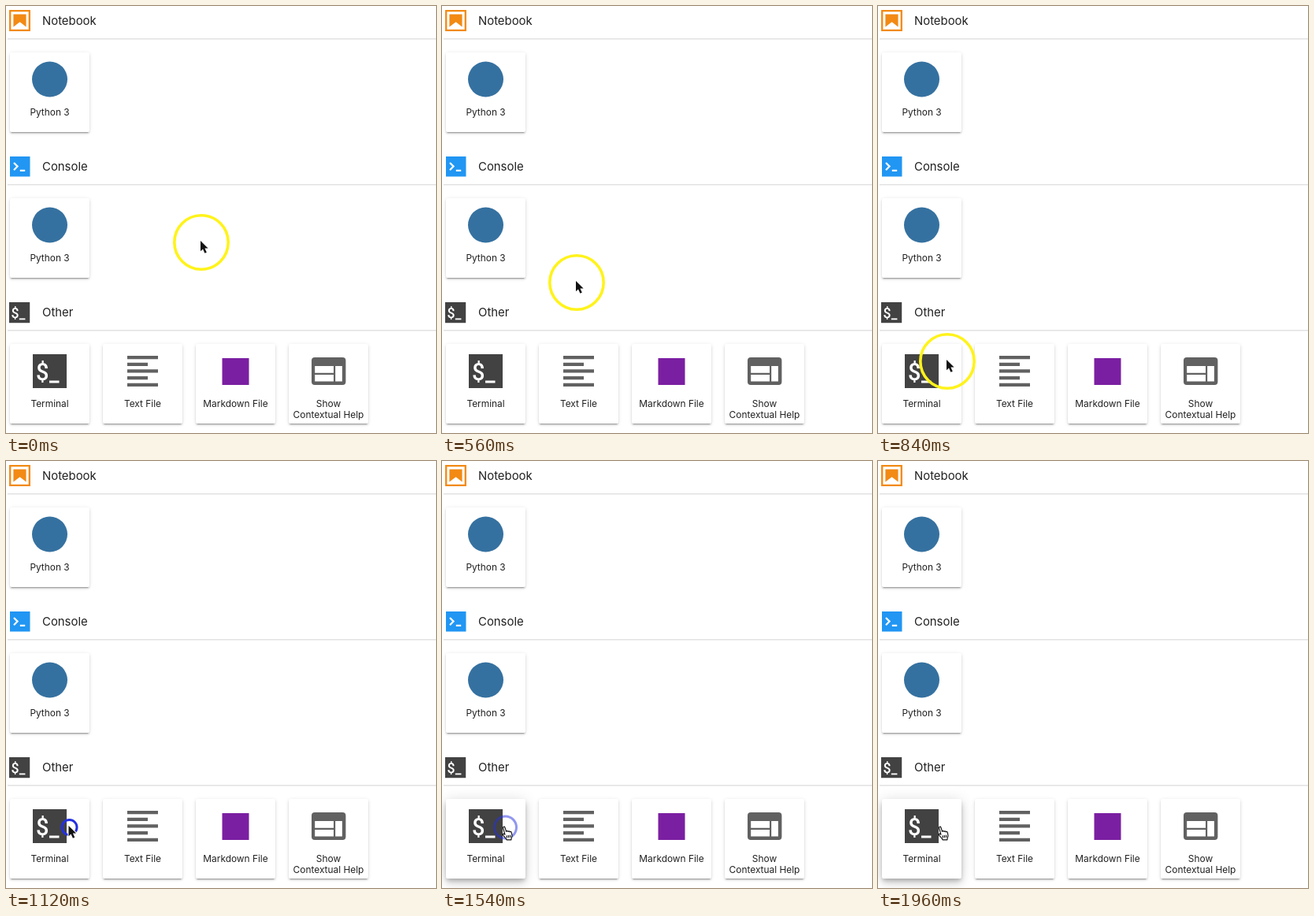
Animation of 546x542 px, one loop 2130 ms. Source, as an HTML page:

```html
<!DOCTYPE html>
<html lang="en">
<head>
<meta charset="utf-8">
<title>Launcher</title>
<style>
html, body { margin: 0; width: 100%; height: 100%; overflow: hidden; background: #fff; }
.card { position: absolute; width: 101px; height: 101px; border-radius: 2px; background: #fff; }
svg { position: absolute; left: 0; top: 0; }
text { font-family: Inter, "Open Sans", sans-serif; fill: #212121; }
.head { font-size: 14.9px; }
.label { font-size: 11.9px; text-anchor: middle; }
.dollar { font: 500 29px Roboto, sans-serif; fill: #fff; }
</style>
</head>
<body>
<svg id="stage" width="546" height="542" viewBox="0 0 546 542">
  <defs>
    <g id="terminal">
      <path fill="#424242" d="M0 0h43v43H0z"/>
      <text class="dollar" x="4" y="32.5">$</text>
      <path fill="#fff" d="M21 33.5h12.5v3H21z"/>
    </g>
  </defs>

  <!-- section icons -->
  <g fill="#f28a14">
    <path fill="none" stroke="#f28a14" stroke-width="2.3" d="M5.2 6.2h24.6v24.6H5.2z"/>
    <path d="M9.4 10.4h16.2v16.2l-8-6.3-8.2 6.3z"/>
  </g>
  <path fill="#2196f3" d="M5 191h25.5v25.5H5z"/>
  <path fill="none" stroke="#fff" stroke-width="2.2" d="M10 199l4.6 4.6-4.6 4.6M17.8 208.8h6.4"/>
  <use href="#terminal" transform="translate(4 376) scale(.61)"/>

  <!-- card icons -->
  <g fill="#3571a0">
    <circle cx="55.5" cy="93" r="22.5"/>
    <circle cx="55.5" cy="278" r="22.5"/>
  </g>
  <use href="#terminal" x="34" y="442"/>
  <path fill="#616161" d="M154 444h39v4.3h-39zm0 8.7h26v4.3h-26zm0 8.6h39v4.3h-39zm0 8.7h26v4.3h-26zm0 8.7h39v4.3h-39z"/>
  <path fill="#7b1fa2" d="M274.5 447h34v34h-34z"/>
  <rect x="388" y="446" width="43.4" height="35" rx="4" fill="#616161"/>
  <path fill="#fff" d="M392.2 457h23.8v8.7h-23.8zm0 10.9h23.8v8.7h-23.8zm26-10.9h8.7v19.6h-8.7z"/>

  <g id="static"></g>

  <circle id="halo" r="34.2" fill="none" stroke="#fff31a" stroke-width="3.6"/>
  <circle id="click" cx="80.5" cy="465" fill="none" stroke="#2430e0" stroke-width="3"/>
  <path id="arrow" fill="#111" stroke="#fff" stroke-width="2" paint-order="stroke" stroke-linejoin="round"
    d="M0 0v13.2l3-2.8 2.4 5.4 2.4-1.1-2.4-5.2h4.2z"/>
  <path id="hand" transform="translate(75 463)" fill="#fff" stroke="#111" stroke-width="1.2" stroke-linejoin="round"
    d="M4.9 11.2L2.6 2.8c-.4-1.7 1.8-2.3 2.3-.7l1.7 5.3c.3-1.3 2-1.2 2.3.1.5-1 2-.8 2.3.4.7-.8 1.9-.4 2.1.6l.6 3.5c.2 1.5-.4 2.3-.8 3.7l-.2 2.1H7.1c-.7-2-2.7-3.7-4.3-5.4-1-1.1-.5-2.6.8-2.1zM7 12.3l.6 3M9.2 12l.5 3.1M11.4 11.8l.3 3"/>
</svg>
<script>
const el = id => document.getElementById(id);
const stage = el("stage");

function card(x, y, ...lines) {
  const div = document.createElement("div");
  div.className = "card";
  div.style.left = x + "px";
  div.style.top = y + "px";
  stage.before(div);
  lines.forEach((line, i) => addText("label", x + 50.5, y + 80 + 14 * i, line));
  return div;
}

function addText(cls, x, y, str) {
  el("static").innerHTML += `<text class="${cls}" x="${x}" y="${y}">${str}</text>`;
}

["Notebook", "Console", "Other"].forEach((title, i) => {
  const y = 185 * i;
  addText("head", 46, y + 24.3, title);
  el("static").innerHTML += `<path stroke="#e2e2e2" stroke-width="1.5" d="M2 ${y + 41.75}H546"/>`;
});

const terminal = card(5, 429, "Terminal");
const cards = [
  card(5, 59, "Python 3"),
  card(5, 244, "Python 3"),
  card(123, 429, "Text File"),
  card(241, 429, "Markdown File"),
  card(359, 429, "Show", "Contextual Help")
];

// Card elevation, from resting (0) to hovered (1)
function elevate(div, h) {
  const mix = (a, b) => a + (b - a) * h + "px";
  div.style.boxShadow =
    `0 3px ${mix(1, 5)} ${mix(-2, -1)} rgba(0,0,0,.2),` +
    `0 ${mix(2, 6)} ${mix(2, 10)} rgba(0,0,0,.14),` +
    `0 1px ${mix(5, 18)} rgba(0,0,0,.12)`;
}
cards.forEach(div => elevate(div, 0));

const LOOP = 2130, STEP = 140, PRESS = 7, HOVER = 8;
const path = [[248, 300], [247, 300], [222, 316], [171, 351], [124, 405], [88, 451], [81, 464], [80.5, 465]];

const show = (id, on) => el(id).setAttribute("visibility", on ? "visible" : "hidden");

function draw(now) {
  const t = now % LOOP;
  const step = Math.min(13, Math.max(0, Math.floor(t / STEP) - 1));
  const [x, y] = path[Math.min(step, PRESS)];
  const age = step - PRESS;

  show("halo", age < 0);
  show("click", age >= 0 && age < 6);
  show("arrow", step < HOVER);
  show("hand", step >= HOVER);

  el("halo").setAttribute("cx", x);
  el("halo").setAttribute("cy", y);
  el("arrow").setAttribute("transform", `translate(${x - 1} ${y - 2})`);
  el("click").setAttribute("r", 9.5 + 1.5 * Math.max(0, age));
  el("click").setAttribute("opacity", 1 - Math.max(0, age) / 6);
  elevate(terminal, Math.min(1, Math.max(0, age / 2)));
  requestAnimationFrame(draw);
}
draw(performance.now());
</script>
</body>
</html>
```
